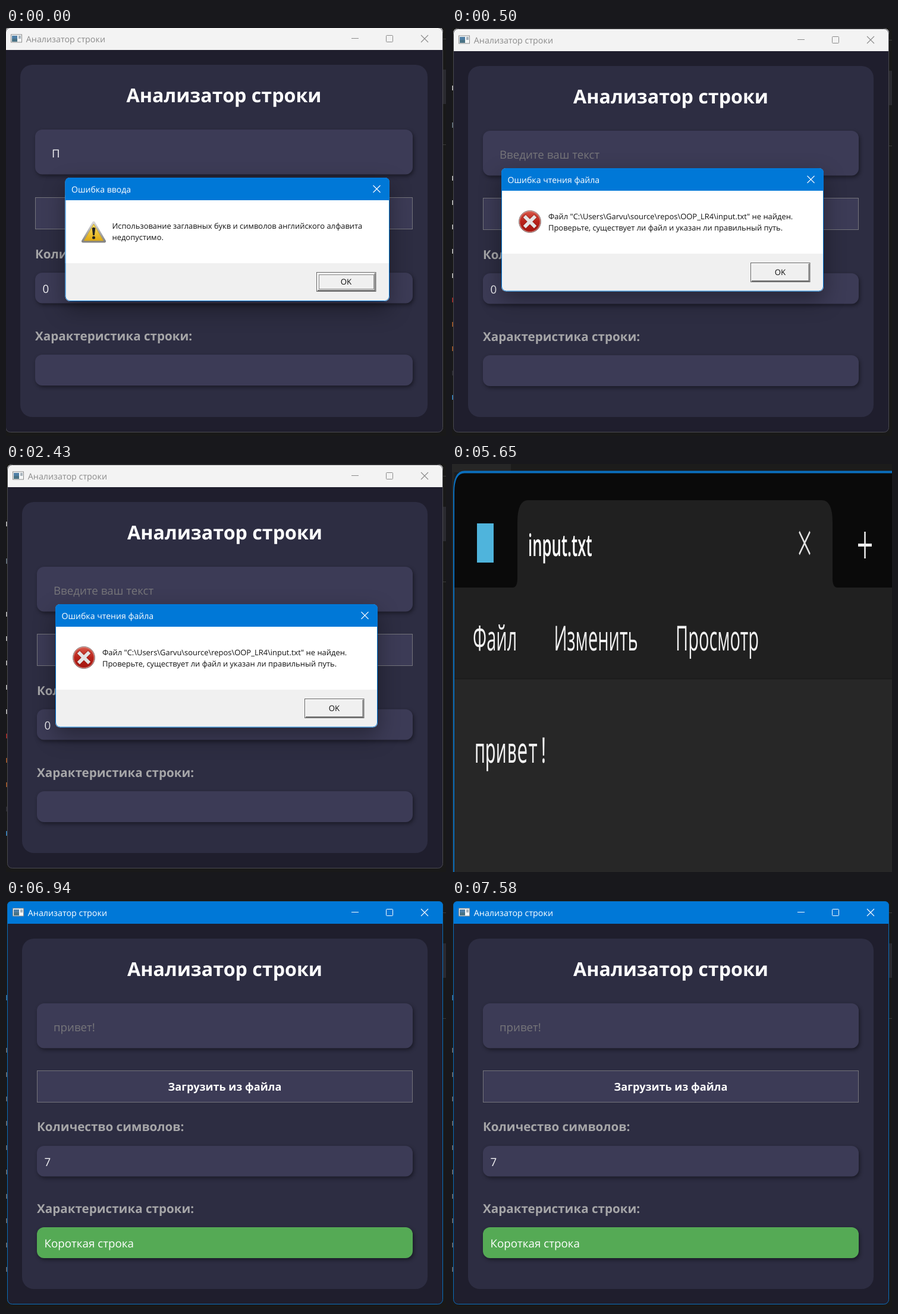
An HTML page for the animation above (8 s loop, 740 by 687 pixels).

```html
<!DOCTYPE html>
<html lang="ru">
<head>
<meta charset="utf-8">
<title>Анализатор строки</title>
<style>
html, body { margin: 0; width: 100%; height: 100%; overflow: hidden; background: #171717; }
svg { display: block; width: 740px; height: 687px; }
text { font-family: "Open Sans", "Noto Sans", sans-serif; text-rendering: geometricPrecision; white-space: pre; }
.bold { font-weight: 700; }
.medium { font-weight: 500; }
.mono { font-family: "Noto Sans Mono", "DejaVu Sans Mono", monospace; font-weight: 500; }
.field { filter: drop-shadow(2px 3px 3px rgba(0, 0, 0, .42)); }
.dialog { filter: drop-shadow(0 14px 18px rgba(0, 0, 0, .36)); }
</style>
</head>
<body>
<svg id="stage" viewBox="0 0 740 687" xmlns="http://www.w3.org/2000/svg">
<defs>
  <linearGradient id="gold" x2="0" y2="1"><stop stop-color="#fbe36a"/><stop offset="1" stop-color="#e0a911"/></linearGradient>
  <linearGradient id="steel" x2="0" y2="1"><stop stop-color="#d8d8d8"/><stop offset="1" stop-color="#858585"/></linearGradient>
  <linearGradient id="red" x2="0" y2="1"><stop stop-color="#d9594a"/><stop offset=".5" stop-color="#b8231a"/><stop offset="1" stop-color="#a3150f"/></linearGradient>
</defs>
</svg>
<script>
const LOOP = 8000;
const STARTS = [0, 500, 3720, 6940];
const BLUE = '#0078d7';

const rect = (x, y, w, h, fill, more = '') =>
  `<rect x="${x}" y="${y}" width="${w}" height="${h}" fill="${fill}" ${more}/>`;
const path = (d, stroke, width = 1, more = '') =>
  `<path d="${d}" fill="none" stroke="${stroke}" stroke-width="${width}" ${more}/>`;
const text = (x, y, size, fill, str, more = '') =>
  `<text x="${x}" y="${y}" font-size="${size}" fill="${fill}" ${more}>${str}</text>`;
const cross = (x, y, rx, ry, stroke, width) =>
  path(`M${x - rx} ${y - ry}L${x + rx} ${y + ry}M${x + rx} ${y - ry}L${x - rx} ${y + ry}`, stroke, width);
const middle = 'text-anchor="middle"';

function titleBar(o) {
  const { x, top, bar, ink, glyph } = o;
  const g = bar - 19.5;
  return `<path d="M${x} ${bar}V${top + 8}q0-8 8-8H727q8 0 8 8V${bar}z" fill="${o.barFill}"/>` +
    rect(x + 9.5, g - 6.5, 18, 13, '#f4f6f7', 'stroke="#8d8d8d"') +
    rect(x + 11, g - 4.5, 9, 10, '#4f7fa6') +
    rect(x + 11, g + .5, 9, 5, '#4a7385') +
    rect(x + 22, g - 4.5, 4, 5, '#a9b4bc') +
    text(x + 34.8, g + 6, 14.3, ink, 'Анализатор строки') +
    path(`M581 ${g}h12`, glyph) +
    rect(639.5, g - 5, 11, 11, 'none', `stroke="${glyph}" rx="1"`) +
    cross(704, g + .5, 6, 6, glyph, 1.1);
}

function field(x, y, h, fill = '#3c3b56') {
  return rect(x, y, 684 - x, h, fill, 'rx="12" class="field"');
}

// rows: panel, input, button, count label, count box, kind label, kind box
function appWindow(o) {
  const [panel, input, button, countLabel, countBox, kindLabel, kindBox] = o.rows;
  const left = o.x + 25, box = o.x + 50, center = (left + 709) / 2;
  return rect(o.x, o.top, 735 - o.x, 681 - o.top, '#1f1e2d', 'rx="8"') +
    titleBar(o) +
    rect(o.x + .5, o.top + .5, 734 - o.x, 680 - o.top, 'none', `rx="8" stroke="${o.edge}"`) +
    rect(left, panel, 709 - left, 655 - panel, '#2d2d42', 'rx="20"') +
    text(center, panel + 63, 32.2, '#fff', 'Анализатор строки', `class="bold" ${middle}`) +
    field(box, input, 75.5) +
    text(box + 28, input + 47, 18.7, o.inputInk, o.input) +
    rect(box + .5, button + .5, 683 - box, 53, '#3c3b56', 'stroke="#74747c"') +
    text(center, button + 34, 18.1, '#fff', 'Загрузить из файла', `class="bold" ${middle}`) +
    text(box, countLabel, 20.6, '#a6a6a8', 'Количество символов:', 'class="bold"') +
    field(box, countBox, 51.5) +
    text(box + 12.5, countBox + 34, 18.8, '#f2f2f4', o.count) +
    text(box, kindLabel, 20.6, '#a6a6a8', 'Характеристика строки:', 'class="bold"') +
    field(box, kindBox, 52, o.kind ? '#55aa55' : undefined) +
    text(box + 12.5, kindBox + 34, 18.8, '#fff', o.kind || '');
}

function okButton(x, y, focus) {
  return rect(x + .5, y + .5, 99.5, 32, '#f0f0f0', 'stroke="#646464"') +
    path(`M${x + 1.5} ${y + 31}V${y + 1.5}H${x + 98}`, '#fff') +
    path(`M${x + 2} ${y + 31}H${x + 98.5}V${y + 2}`, '#777', 2) +
    (focus ? rect(x + 4.5, y + 4.5, 92, 24, 'none', 'stroke="#222" stroke-dasharray="1 1"') : '') +
    text(x + 50, y + 21, 13.2, '#111', 'OK', middle);
}

function dialog({ x, y, w, h, title, lines, icon, focus }) {
  const right = x + w;
  return `<g class="dialog">${rect(x, y, w, h, '#f0f0f0', 'rx="8"')}</g>` +
    rect(x, y + 30, w, 114, '#fff') +
    `<path d="M${x} ${y + 38}v-30q0-8 8-8h${w - 16}q8 0 8 8v30z" fill="${BLUE}"/>` +
    rect(x + .5, y + .5, w - 1, h - 1, 'none', `rx="8" stroke="${BLUE}"`) +
    text(x + 10.5, y + 25, 14.1, '#fff', title) +
    cross(right - 21.5, y + 19, 6, 6, '#fff', 1.1) +
    `<g transform="translate(${x + 48} ${y + 90})">${icon}</g>` +
    lines.map((s, i) => text(x + 79, y + 86 + i * 19, 12.95, '#111', s)).join('') +
    okButton(right - 123, y + 159, focus);
}

const warnIcon =
  '<path d="M0-14L18 17H-18z" fill="url(#steel)" stroke="url(#steel)" stroke-width="5" stroke-linejoin="round"/>' +
  '<path d="M0-12L16 16H-16z" fill="url(#gold)" stroke="#c9a42c" stroke-linejoin="round"/>' +
  '<path d="M-2.8-5q2.8-2.5 5.6 0L1.3 7h-2.6z" fill="#222"/><circle cy="11" r="2.5" fill="#222"/>';

const errorIcon =
  '<circle r="18.5" fill="url(#red)" stroke="#8f8f8f"/><circle r="17.3" fill="none" stroke="#d9a39d"/>' +
  path('M-7-7L7 7M7-7L-7 7', '#8c1712', 8, 'stroke-linecap="square" opacity=".5"') +
  path('M-7-7L7 7M7-7L-7 7', '#e4e4e4', 6, 'stroke-linecap="square"');

// Slivers of the editor visible beside the window
function backdrop(y, inks) {
  return rect(0, 0, 740, 687, '#191919') +
    rect(735, 70 + y, 5, 58, '#2a2a30') +
    path(`M735 ${18.5 + y}h5M735 ${196.5 + y}h5`, '#3a3a3a') +
    inks.map((c, i) => rect(0, 249 + i * 41, 1.5, 8, c)).join('');
}

function notepad() {
  const ink = '#f2f2f2';
  return rect(0, 0, 740, 687, '#1c1c1b') + rect(0, 0, 99, 14, '#262626') + rect(0, 14, 4, 673, '#242424') +
    '<path d="M3 690V48Q3 13 21 13H745V690z" fill="#0a0a0a"/>' +
    rect(4, 208, 736, 154, '#202020') + rect(4, 362, 736, 325, '#272727') + rect(4, 360.5, 736, 2, '#1c1c1c') +
    '<path d="M102 208Q110 208 110 192V98Q110 61 128 61H622Q640 61 640 98V192Q640 208 648 208z" fill="#202020"/>' +
    '<g transform="scale(.5 1)">' +
    path('M6 690V48Q6 13.5 42 13.5H1490', '#0b6fbd', 4) +
    rect(84, 100, 56, 66, '#4fb4dc') +
    text(256, 155, 51.5, '#fff', 'input.txt', 'font-weight="600"') +
    cross(1186, 133, 18, 19, '#e4e4e4', 4) +
    path('M1366 136.5h46M1389 114v45', '#eee', 5) +
    ['Файл', 'Изменить', 'Просмотр'].map((s, i) =>
      text([70, 343, 752][i], 314, 58, ink, s, 'class="medium"')).join('') +
    text(76, 503, 59.5, ink, 'привет!', 'class="mono"') +
    '</g>';
}

const light = { barFill: '#f3f3f3', ink: '#8b8b8b', glyph: '#8b8b8b', edge: '#4a4a50', count: '0' };

const scenes = [
  backdrop(0, []) +
  appWindow({
    ...light, x: -1, top: -1, bar: 37, input: 'П', inputInk: '#f2f2f4',
    rows: [62, 171, 285, 388, 412, 526, 550]
  }) +
  dialog({
    x: 99.5, y: 252, w: 545.5, h: 208, title: 'Ошибка ввода', icon: warnIcon, focus: true,
    lines: ['Использование заглавных букв и символов английского алфавита', 'недопустимо.']
  }),

  backdrop(2, ['#ccc', '#ccc', '#ccc', '#ccc', '#ccc', '#b5312f', '#b0602f', '#b0602f', '#33333b', '#3f8fd0']) +
  rect(0, 97, 1.5, 8, '#ccc') + rect(0, 159, 1.5, 9, '#71808c') +
  appWindow({
    ...light, x: 2, top: 1, bar: 39, input: 'Введите ваш текст', inputInk: '#77767a',
    rows: [64, 173, 286, 389, 413, 527, 551]
  }) +
  dialog({
    x: 83, y: 236, w: 542, h: 207.5, title: 'Ошибка чтения файла', icon: errorIcon,
    lines: [String.raw`Файл "C:\Users\Garvu\source\repos\OOP_LR4\input.txt" не найден.`,
      'Проверьте, существует ли файл и указан ли правильный путь.']
  }),

  notepad(),

  backdrop(3, Array(10).fill('#77777a')) + rect(0, 160, 1.5, 9, '#3f7fb0') +
  appWindow({
    x: 2, top: 2, bar: 40, barFill: BLUE, ink: '#fff', glyph: '#fff', edge: '#0b6fbd',
    input: 'привет!', inputInk: '#77767a', count: '7', kind: 'Короткая строка',
    rows: [65, 174, 287, 389, 414, 527, 551]
  })
];

const stage = document.getElementById('stage');
stage.insertAdjacentHTML('beforeend', scenes.map(s => `<g class="scene">${s}</g>`).join(''));
const groups = [...stage.querySelectorAll('.scene')];

function draw(ms) {
  const t = ms % LOOP;
  const now = STARTS.filter(s => s <= t).length - 1;
  groups.forEach((g, i) => { g.style.display = i === now ? '' : 'none'; });
}

function tick() {
  draw(performance.now());
  requestAnimationFrame(tick);
}
tick();
</script>
</body>
</html>
```
